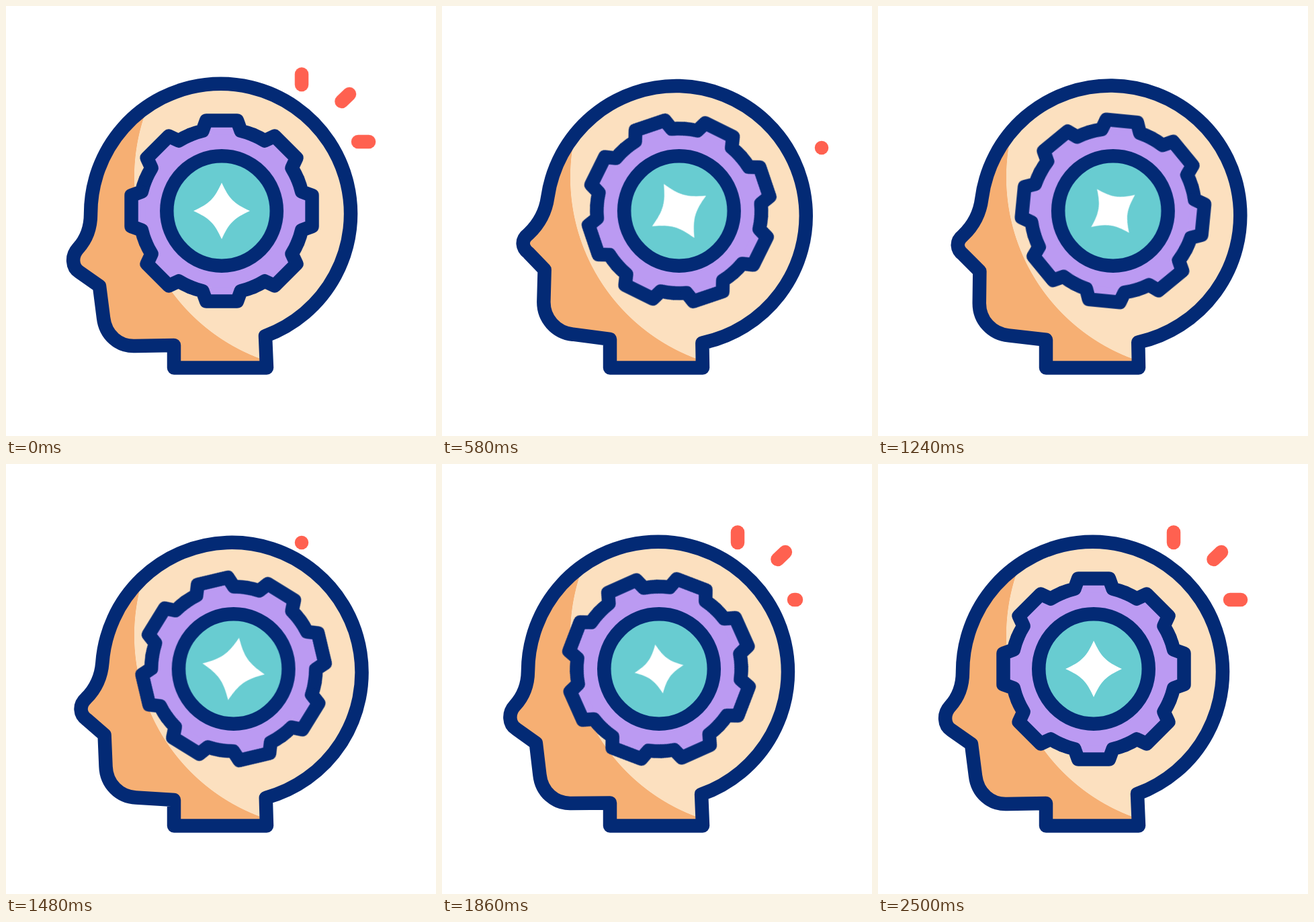
These frames come from a looping animation (640 px wide and 640 px high, 2.82 s). An HTML page without scripts:

```html
<!DOCTYPE html>
<html lang="en">
<head>
<meta charset="utf-8">
<title>Thinking head</title>
<style>
  html, body { margin: 0; width: 100%; height: 100%; overflow: hidden; background: #fff; }
  svg { display: block; width: 100vw; height: 100vh; }

  .head, .slide, .gear, .spin, .pulse, .sparks, .sparks line {
    animation: 2820ms linear infinite;
  }
  .head, .slide { animation-timing-function: cubic-bezier(.39, .575, .565, 1); }
  .outline { stroke: #032a75; stroke-width: 20.5; stroke-linecap: round; stroke-linejoin: round; }

  .head { fill: url(#skin); animation-name: nod; }
  .slide { animation-name: slide; }
  .gear { fill: #bb9af2; animation-name: turn; }
  .spin { animation-name: spin; }
  .pulse { animation-name: pulse; animation-timing-function: cubic-bezier(.333, 0, .667, 1); }
  .sparks { stroke: #ff6150; stroke-width: 20.5; stroke-linecap: round; animation-name: drift; }
  .sparks line {
    stroke-dasharray: 1 2;
    animation-name: spark;
    animation-timing-function: cubic-bezier(.333, 0, .667, 1);
    animation-fill-mode: backwards;
  }
  .sparks line:nth-child(2) { animation-delay: 165ms; }
  .sparks line:nth-child(3) { animation-delay: 325ms; }

  @keyframes nod {
    0%, 72%, 100% {
      d: path("M388 538.5L386 491A193.5 193.5 0 1 0 126 309.75C126 332 118 349 107 361C97 372 98 389 109 396L139 417L145 464C148 490 168 507 192 506L250 505L250 538.5Z");
    }
    29.8%, 33.3% {
      d: path("M388 538.5L387.5 502.5A193.2 193.2 0 1 0 160.4 282C157 304 147 322 131 337C119 346 121 357 131 365L154 390L152 437C151 463 170 484 195 487L250 495L250 538.5Z");
      animation-timing-function: cubic-bezier(.37, 0, .63, 1);
    }
  }
  @keyframes slide {
    0%, 72%, 100% { transform: translate(321px, 305px); }
    29.8%, 33.3% {
      transform: translate(356px, 305px);
      animation-timing-function: cubic-bezier(.37, 0, .63, 1);
    }
  }
  @keyframes turn {
    0% { transform: rotate(0deg); animation-timing-function: cubic-bezier(.333, 0, .61, 1); }
    88.3%, 100% { transform: rotate(180deg); }
  }
  @keyframes spin {
    0% { transform: rotate(0deg); }
    9.2% { transform: rotate(-11.5deg); }
    20.6% { transform: rotate(-29.5deg); }
    35.5% { transform: rotate(-82.5deg); }
    52.5% { transform: rotate(-170deg); animation-timing-function: ease-out; }
    66% { transform: rotate(-189deg); animation-timing-function: ease-in-out; }
    88.6%, 100% { transform: rotate(-180deg); }
  }
  @keyframes pulse {
    0%, 88.6%, 100% { transform: scale(1); }
    17.7%, 53.2% { transform: scale(1.12); }
    35.5%, 70.9% { transform: scale(.82); }
  }
  @keyframes drift {
    0%, 22%, 100% { transform: translate(0, 0); }
    9.22% { transform: translate(10px, 3px); }
    20.57%, 21.9% { transform: translate(25px, 9px); }
  }
  /* each dash shrinks towards its outer end, then regrows from the inner one */
  @keyframes spark {
    0%, .5% { stroke-dashoffset: 0; opacity: 1; }
    9.12% { stroke-dashoffset: -1; opacity: 1; }
    9.13% { stroke-dashoffset: -1; opacity: 0; }
    52.1% { stroke-dashoffset: 1; opacity: 0; }
    52.11% { stroke-dashoffset: 1; opacity: 1; }
    60.6%, 100% { stroke-dashoffset: 0; opacity: 1; }
  }
</style>
</head>
<body>
<svg viewBox="0 0 640 640">
  <defs>
    <radialGradient id="skin" gradientUnits="userSpaceOnUse" cx="479" cy="255" r="576">
      <stop offset=".4995" stop-color="#fce0bf"/>
      <stop offset=".5007" stop-color="#f6af73"/>
    </radialGradient>
    <path id="tooth" d="M-46.9-113.2A122.5 122.5 0 0 1-28.6-119.1L-23-134.5H23L28.6-119.1A122.5 122.5 0 0 1 46.9-113.2"/>
  </defs>

  <path class="head outline"/>

  <g class="slide">
    <g class="gear">
      <circle r="115"/>
      <g class="outline">
        <use href="#tooth"/>
        <use href="#tooth" transform="rotate(45)"/>
        <use href="#tooth" transform="rotate(90)"/>
        <use href="#tooth" transform="rotate(135)"/>
        <use href="#tooth" transform="rotate(180)"/>
        <use href="#tooth" transform="rotate(225)"/>
        <use href="#tooth" transform="rotate(270)"/>
        <use href="#tooth" transform="rotate(315)"/>
      </g>
    </g>
    <circle class="outline" r="81.75" fill="#68ccd1"/>
    <g class="spin">
      <path class="pulse" fill="#fff" d="M0-42C11-18 18-11 42 0C18 11 11 18 0 42C-11 18-18 11-42 0C-18-11-11-18 0-42Z"/>
    </g>
  </g>

  <g class="sparks">
    <line pathLength="1" x1="440" y1="117" x2="440" y2="101.5"/>
    <line pathLength="1" x1="499.5" y1="142" x2="511" y2="131"/>
    <line pathLength="1" x1="524" y1="202" x2="540" y2="202"/>
  </g>
</svg>
</body>
</html>
```
